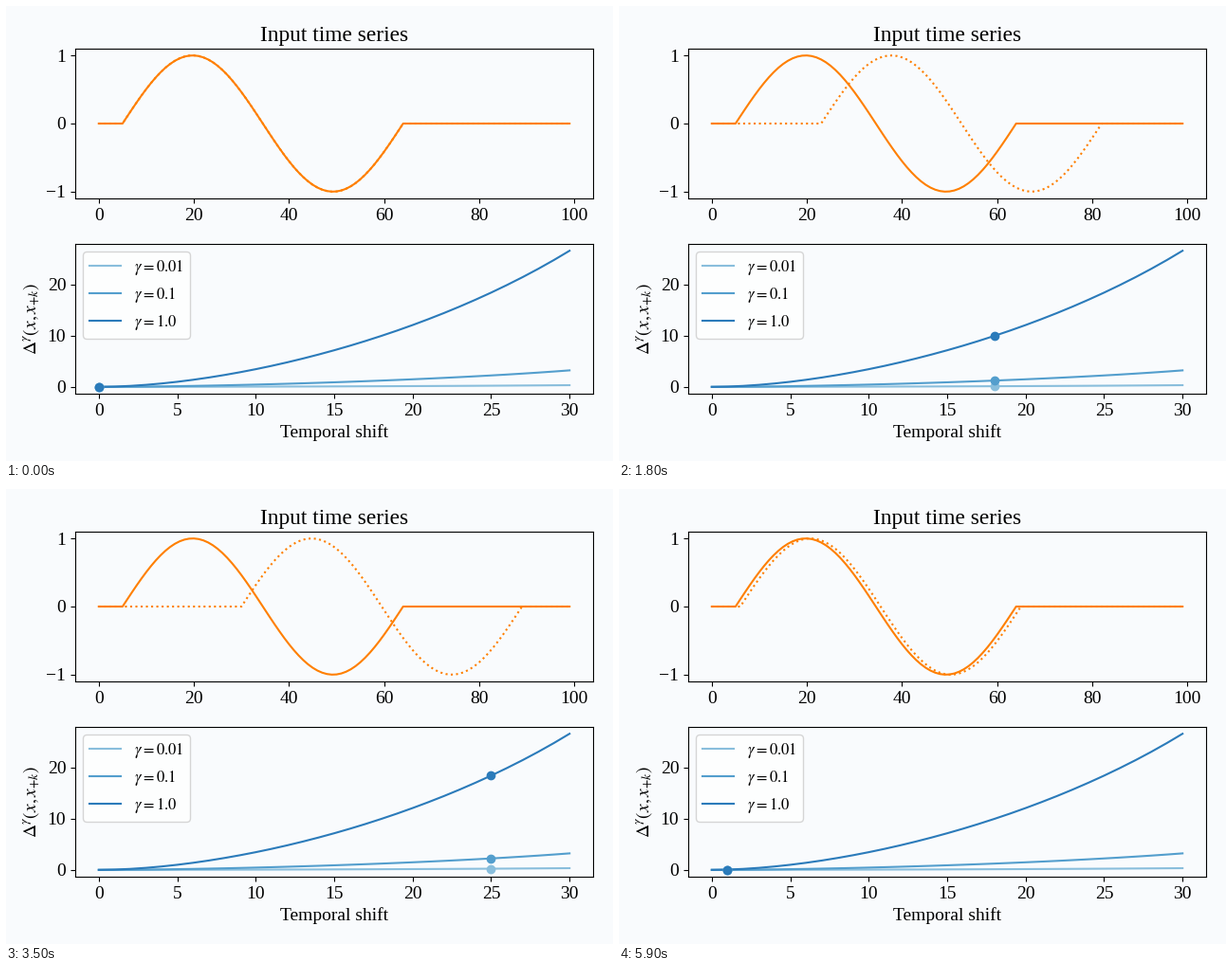
These frames come from a looping animation (640 px wide and 480 px high, 6000 ms). A matplotlib script:

```python
import numpy as np
import matplotlib.pyplot as plt
from matplotlib.animation import FuncAnimation

W, H, DPI = 640, 480, 100
BG = "#f9fbfd"
ORANGE = "#ff7f00"
BLUES = ["#89bedc", "#539ecd", "#2b7bba"]
GAMMAS = [0.01, 0.1, 1.0]
PEAKS = [0.335, 3.22, 26.55]
N, START, WAVE, MAX_SHIFT = 100, 5, 60, 30

plt.rcParams.update({
    "font.family": "Liberation Serif",
    "font.size": 14,
    "mathtext.fontset": "stix",
})


def series(shift):
    """One sine period on a zero baseline, delayed by `shift` samples."""
    x = np.zeros(N)
    first = START + shift
    x[first:first + WAVE] = np.sin(np.linspace(0, 2 * np.pi, WAVE))
    return x


def soft_dtw(x, ys, gammas):
    """Soft-DTW of x to every row of ys, for every gamma."""
    g = np.array(gammas)[:, None]
    none = np.full((len(gammas), len(ys)), -np.inf)
    prev = [np.zeros_like(none)] + [none] * N
    for xi in x:
        row = [none]
        for j in range(N):
            paths = np.logaddexp(np.logaddexp(prev[j], prev[j + 1]), row[j])
            row.append(paths - (xi - ys[:, j]) ** 2 / g)
        prev = row
    return -g * prev[-1]


def add_axes(top, bottom):
    left, right = 73, 619
    return fig.add_axes([left / W, 1 - bottom / H,
                         (right - left) / W, (bottom - top) / H],
                        facecolor=BG)


shifts = np.arange(MAX_SHIFT + 1)
signals = np.array([series(k) for k in shifts])
deltas = soft_dtw(signals[0], signals, GAMMAS)
deltas -= deltas[:, :1]
deltas *= (np.array(PEAKS) / deltas[:, -1])[:, None]

fig = plt.figure(figsize=(W / DPI, H / DPI), dpi=DPI, facecolor=BG)

ax_top = add_axes(45, 203)
ax_top.plot(signals[0], color=ORANGE)
shifted, = ax_top.plot(signals[0], ":", color=ORANGE)
ax_top.set_title("Input time series")

ax_low = add_axes(251, 409)
for gamma, delta, color in zip(GAMMAS, deltas, BLUES):
    ax_low.plot(shifts, delta, color=color, label=rf"$\gamma = {gamma}$")
dots = [ax_low.plot([0], [0], "o", color=color)[0] for color in BLUES]
ax_low.set_xlabel("Temporal shift")
ax_low.set_ylabel(r"$\Delta^{\gamma}(x, x_{+k})$")
ax_low.legend(loc="upper left", fontsize=12, labelspacing=0.54,
              facecolor="white")


def update(frame):
    k = MAX_SHIFT - abs(MAX_SHIFT - frame)
    shifted.set_ydata(signals[k])
    for dot, delta in zip(dots, deltas):
        dot.set_data([k], [delta[k]])
    return [shifted, *dots]


anim = FuncAnimation(fig, update, frames=2 * MAX_SHIFT, interval=100,
                     repeat=True, repeat_delay=0)
plt.show()
```
